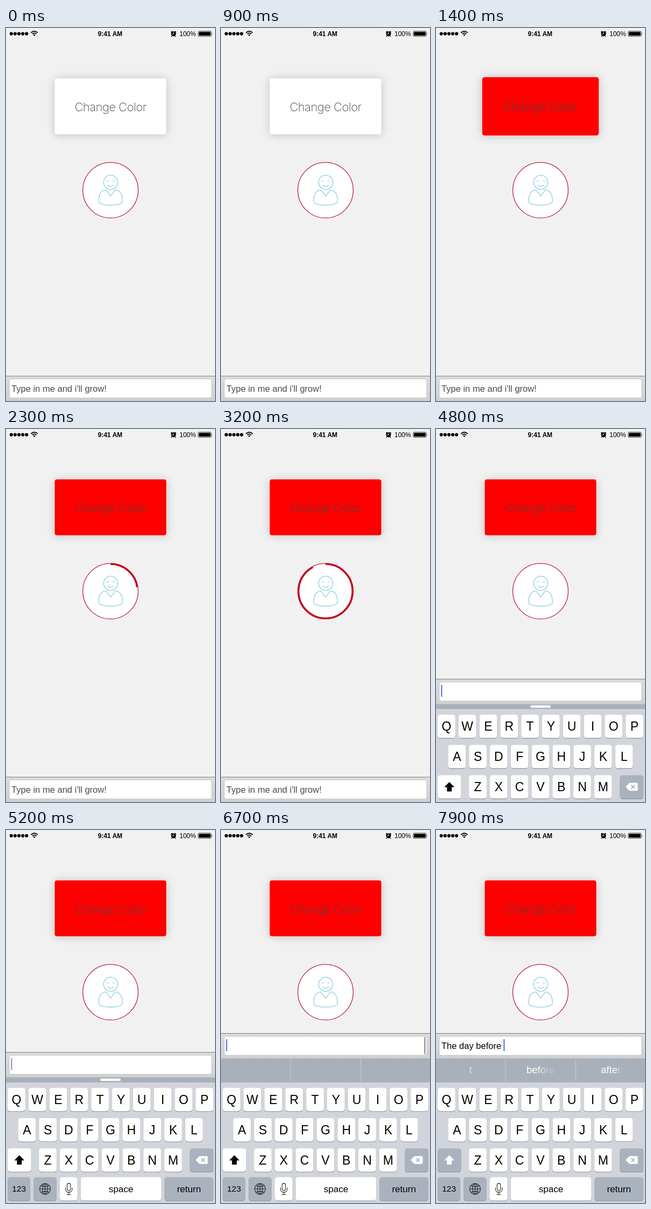
These frames come from a looping animation (388 px wide and 690 px high, 8 s). An HTML page:

```html
<!DOCTYPE html>
<html lang="en">
<head>
<meta charset="utf-8">
<title>Spring controls</title>
<style>
html, body { margin: 0; width: 100%; height: 100%; overflow: hidden; background: #f1f1f1; }
svg { display: block; width: 388px; height: 690px; font-family: "Liberation Sans", Arial, sans-serif; }

/* Every animation shares one 8 s loop, so 1% is 80 ms. */
.anim { animation: 8s linear infinite; }
.snap { animation-timing-function: step-end; }
.mid { text-anchor: middle; }

#button { transform-origin: 194px 145px; animation-name: buttonPop; animation-timing-function: ease-in-out; }
@keyframes buttonPop {
  0%, 12.5% { transform: scale(1); }
  14.5% { transform: scale(.95); }
  17.5% { transform: scale(1.045); }
  20% { transform: scale(.985); }
  22.5%, 100% { transform: scale(1); }
}
#face { filter: drop-shadow(0 1px 8px rgba(0, 0, 0, .2)); animation-name: redden; }
@keyframes redden {
  0%, 14.5% { fill: #fff; }
  16.5%, 100% { fill: #f00; }
}
#title { font: 200 22px Inter, "Liberation Sans", sans-serif; letter-spacing: -.55px; fill: #444; }

#avatar { transform-origin: 194px 300px; animation-name: avatarPop; animation-timing-function: ease-in-out; }
@keyframes avatarPop {
  0%, 45% { transform: scale(1); }
  47% { transform: scale(.96); }
  50% { transform: scale(1.04); }
  52.5% { transform: scale(.985); }
  55%, 100% { transform: scale(1); }
}
#ring { animation-name: fillRing; }
@keyframes fillRing {
  0%, 25% { stroke-dashoffset: 100; opacity: 0; }
  25.1% { stroke-dashoffset: 100; opacity: 1; }
  41.25%, 44.5% { stroke-dashoffset: 0; opacity: 1; }
  45%, 100% { stroke-dashoffset: 0; opacity: 0; }
}

#rise { animation-name: rise; animation-timing-function: cubic-bezier(.2, .7, .2, 1); }
@keyframes rise {
  0%, 58.5% { transform: translateY(232.5px); }
  63.75%, 100% { transform: translateY(0); }
}
#lift { animation-name: lift; animation-timing-function: ease-out; }
@keyframes lift {
  0%, 80% { transform: translateY(0); }
  83%, 100% { transform: translateY(-35px); }
}
#grip { animation-name: gripFade; }
@keyframes gripFade { 0%, 81% { opacity: 1; } 83%, 100% { opacity: 0; } }
#dividers { animation-name: dividersShow; }
@keyframes dividersShow { 0%, 82% { opacity: 0; } 83%, 100% { opacity: 1; } }
#scroller { animation-name: scrollerShow; }
@keyframes scrollerShow { 0%, 81% { opacity: 0; } 82%, 86% { opacity: 1; } 88.5%, 100% { opacity: 0; } }

#hint { animation-name: hintShow; }
@keyframes hintShow { 0% { opacity: 1; } 58.5%, 100% { opacity: 0; } }
#caret { animation-name: caretMove; }
@keyframes caretMove {
  0% { transform: translateX(0); }
  88.75% { transform: translateX(33px); }
  93.75% { transform: translateX(64.4px); }
  97.5%, 100% { transform: translateX(116px); }
}
#caret rect { animation-name: blink; }
@keyframes blink {
  0%, 58.4% { opacity: 0; }
  58.5%, 64% { opacity: 1; }
  65% { opacity: .75; }
  65.7%, 71% { opacity: 1; }
  73%, 76.5% { opacity: 0; }
  78.5%, 100% { opacity: 1; }
}

.s1, .s2, .s3, .s4 { opacity: 0; }
.s1 { animation-name: s1; } .s2 { animation-name: s2; }
.s3 { animation-name: s3; } .s4 { animation-name: s4; }
@keyframes s1 { 0% { opacity: 0; } 85.5% { opacity: 1; } 88.75%, 100% { opacity: 0; } }
@keyframes s2 { 0% { opacity: 0; } 88.75% { opacity: 1; } 93.75%, 100% { opacity: 0; } }
@keyframes s3 { 0% { opacity: 0; } 93.75% { opacity: 1; } 97.5%, 100% { opacity: 0; } }
@keyframes s4 { 0% { opacity: 0; } 97.5%, 100% { opacity: 1; } }

#shiftKey { animation-name: shiftKey; }
@keyframes shiftKey { 0% { fill: #fff; } 88.75%, 100% { fill: #aab2bd; } }
#shiftArrow { animation-name: shiftArrow; }
@keyframes shiftArrow { 0% { fill: #000; } 88.75%, 100% { fill: #fff; } }
</style>
</head>
<body>
<svg viewBox="0 0 388 690">
  <defs>
    <linearGradient id="fadeLong">
      <stop offset=".4" stop-color="#fff"/><stop offset=".65" stop-color="#fff" stop-opacity=".45"/>
      <stop offset="1" stop-color="#fff" stop-opacity=".15"/>
    </linearGradient>
    <linearGradient id="fadeEnd">
      <stop offset=".7" stop-color="#fff"/><stop offset="1" stop-color="#fff" stop-opacity=".2"/>
    </linearGradient>
    <linearGradient id="barFill" x2="0" y2="1">
      <stop stop-color="#dedede"/><stop offset="1" stop-color="#d0d0d0"/>
    </linearGradient>
  </defs>
  <rect width="388" height="690" fill="#f1f1f1"/>

  <g id="status">
    <g id="signal"></g>
    <g fill="none" stroke="#000" stroke-width="1.8">
      <path d="M46.3 8.7Q52.5 3.3 58.7 8.7M48.6 11.1Q52.5 7.7 56.4 11.1"/>
    </g>
    <path d="M50.3 12.6Q52.5 11 54.7 12.6L52.5 15Z"/>
    <text class="mid" x="193.3" y="15" font-size="12" font-weight="700">9:41 AM</text>
    <circle cx="311" cy="10.8" r="4.5"/>
    <path d="M306.2 8.2L308.6 5.8M313.4 5.8L315.8 8.2M308 14.6L306.8 16M314 14.6L315.2 16" stroke="#000" stroke-width="1.4"/>
    <path d="M311 8V11H308.6" fill="none" stroke="#fff"/>
    <text x="322" y="15" font-size="12">100%</text>
    <rect x="356.9" y="5.9" width="24" height="9.4" rx="1.5" fill="none" stroke="#000" stroke-width=".8"/>
    <rect x="358.2" y="7.2" width="21.4" height="6.8" rx=".6"/>
    <path d="M382 8.7Q383.6 10.6 382 12.5Z"/>
  </g>

  <g id="button" class="anim">
    <rect id="face" class="anim" x="90.5" y="93.3" width="207" height="103.2" rx="4"/>
    <text id="title" class="mid" x="194" y="153.7">Change Color</text>
  </g>

  <g id="avatar" class="anim" fill="none">
    <circle cx="194" cy="300" r="51.4" fill="#fff" stroke="#bd1f3c" stroke-width="1.3"/>
    <g stroke="#77c3e0" stroke-width="1.1" stroke-linecap="round">
      <circle cx="194.4" cy="285.4" r="13.1"/>
      <path d="M186.3 283.2Q188.7 281.4 191.2 283.2M197.6 283.2Q200 281.4 202.5 283.2" stroke-width=".8"/>
      <path d="M189 290.6Q194.4 295.4 199.8 290.6"/>
      <path d="M185.5 299.5L194.3 311.2L203 299.5C212.5 300.2 216.2 308 216.2 320.5C216.2 325 207 327.6 194 327.6S172 325 172 320.5C172 308 176 300.2 185.5 299.5Z"/>
    </g>
    <circle id="ring" class="anim" cx="194" cy="300" r="50.3" pathLength="100" stroke="#c4041f" stroke-width="3.4"
      stroke-dasharray="100 200" transform="rotate(-90 194 300)"/>
  </g>

  <g id="rise" class="anim">
    <g id="lift" class="anim">
      <rect y="457" width="388" height="60" fill="#a8b0ba"/>
      <rect id="grip" class="anim" x="175" y="459.8" width="38" height="4.4" rx="2.2" fill="#fff"/>
      <rect y="411" width="388" height="46.5" fill="url(#barFill)"/>
      <rect y="410.8" width="388" height="1.2" fill="#858585"/>
      <rect x="6" y="416.5" width="376" height="35.4" rx="3.5" fill="#fff" stroke="#b3b3b3" stroke-width=".8"/>
      <rect id="scroller" class="anim" x="377" y="418" width="2.5" height="32" rx="1.2" fill="#999"/>
      <g font-size="16.55">
        <text id="hint" class="anim snap" x="10" y="440.4" fill="#4b4b4b">Type in me and i'll grow!</text>
        <g id="typed"></g>
      </g>
      <g id="caret" class="anim snap">
        <rect class="anim" x="9.4" y="422" width="2" height="22" fill="#4a6cd8"/>
      </g>
      <path id="dividers" class="anim" d="M129 458V501M259.5 458V501" stroke="#c6ccd4"/>
      <g id="words" class="mid" font-size="18.6" fill="#fff"></g>
    </g>
    <rect y="467" width="388" height="223" fill="#d1d5db"/>
    <g id="keys" class="mid" font-size="23"></g>
    <path id="shiftArrow" class="anim snap" d="M24.8 601.5L34.2 611.2H29.2V619H20.4V611.2H15.4Z" stroke-linejoin="round"/>
    <path d="M352 610.5L359 603.2H373Q374.5 603.2 374.5 605V616Q374.5 617.8 373 617.8H359Z" fill="#fff"/>
    <path d="M362.3 607.2L368.9 613.8M368.9 607.2L362.3 613.8" stroke="#a0a9b5" stroke-width="1.6"/>
    <g fill="none" stroke="#222" stroke-width="1.1">
      <circle cx="72.5" cy="664" r="10"/>
      <ellipse cx="72.5" cy="664" rx="4.8" ry="10"/>
      <path d="M72.5 654V674M62.5 664H82.5M64.8 657.7Q72.5 661.6 80.2 657.7M64.8 670.3Q72.5 666.4 80.2 670.3"/>
      <rect x="113.4" y="653.6" width="6.4" height="13.4" rx="3.2"/>
      <path d="M110.4 661.5V664.5C110.4 672 122.8 672 122.8 664.5V661.5M116.6 670.2V674.5M112.6 674.5H120.6"/>
    </g>
  </g>
</svg>
<script>
const $ = id => document.getElementById(id);

function add(parent, tag, attrs, text = "") {
  const el = document.createElementNS("http://www.w3.org/2000/svg", tag);
  for (const name in attrs) el.setAttribute(name, attrs[name]);
  el.textContent = text;
  return parent.appendChild(el);
}

for (let i = 0; i < 5; i++) add($("signal"), "circle", { cx: 9.8 + 7.1 * i, cy: 10.6, r: 3.1 });

function key(x, y, width, label = "", fill = "#fff", size = 23) {
  const box = { x, width, height: 43.2, rx: 4.6 };
  add($("keys"), "rect", { ...box, y: y + 1.1, fill: "#8b9098" });
  const cap = add($("keys"), "rect", { ...box, y, fill });
  if (label) {
    add($("keys"), "text", { x: x + width / 2, y: y + 21.5 + size * .355, "font-size": size }, label);
  }
  return cap;
}

const grey = "#aab2bd";
const rows = [["QWERTYUIOP", 3.1, 477], ["ASDFGHJKL", 22.5, 533], ["ZXCVBNM", 61.2, 589]];
for (const [letters, left, y] of rows) {
  [...letters].forEach((letter, i) => key(left + 38.78 * i, y, 32.7, letter));
}
const shift = key(3.1, 589, 43.4);
shift.id = "shiftKey";
shift.setAttribute("class", "anim snap");
key(341.5, 589, 43.4, "", grey);
key(3.1, 642.3, 42, "123", grey, 15.5);
key(51.3, 642.3, 42.4, "", grey);
key(100, 642.3, 32.7);
key(138.8, 642.3, 149.4, "space", "#fff", 17);
key(294.4, 642.3, 90.5, "return", grey, 17);

// Typed text and suggestions for each typing stage.
const stages = [
  ["", "I", "The", "I'm"],
  ["The", "same", "day", "first"],
  ["The day", "is", "before", "after"],
  ["The day before", "t", "before", "after"]
];
stages.forEach(([text, ...words], i) => {
  const cls = `anim snap s${i + 1}`;
  add($("typed"), "text", { class: cls, x: 10, y: 440.4 }, text);
  const group = add($("words"), "g", { class: cls });
  const fills = i === 3 ? ["#dde1e6", "url(#fadeLong)", "url(#fadeEnd)"] : ["#fff", "#fff", "#fff"];
  words.forEach((word, n) => add(group, "text", { x: 64 + 130.3 * n, y: 484.5, fill: fills[n] }, word));
});
</script>
</body>
</html>
```
